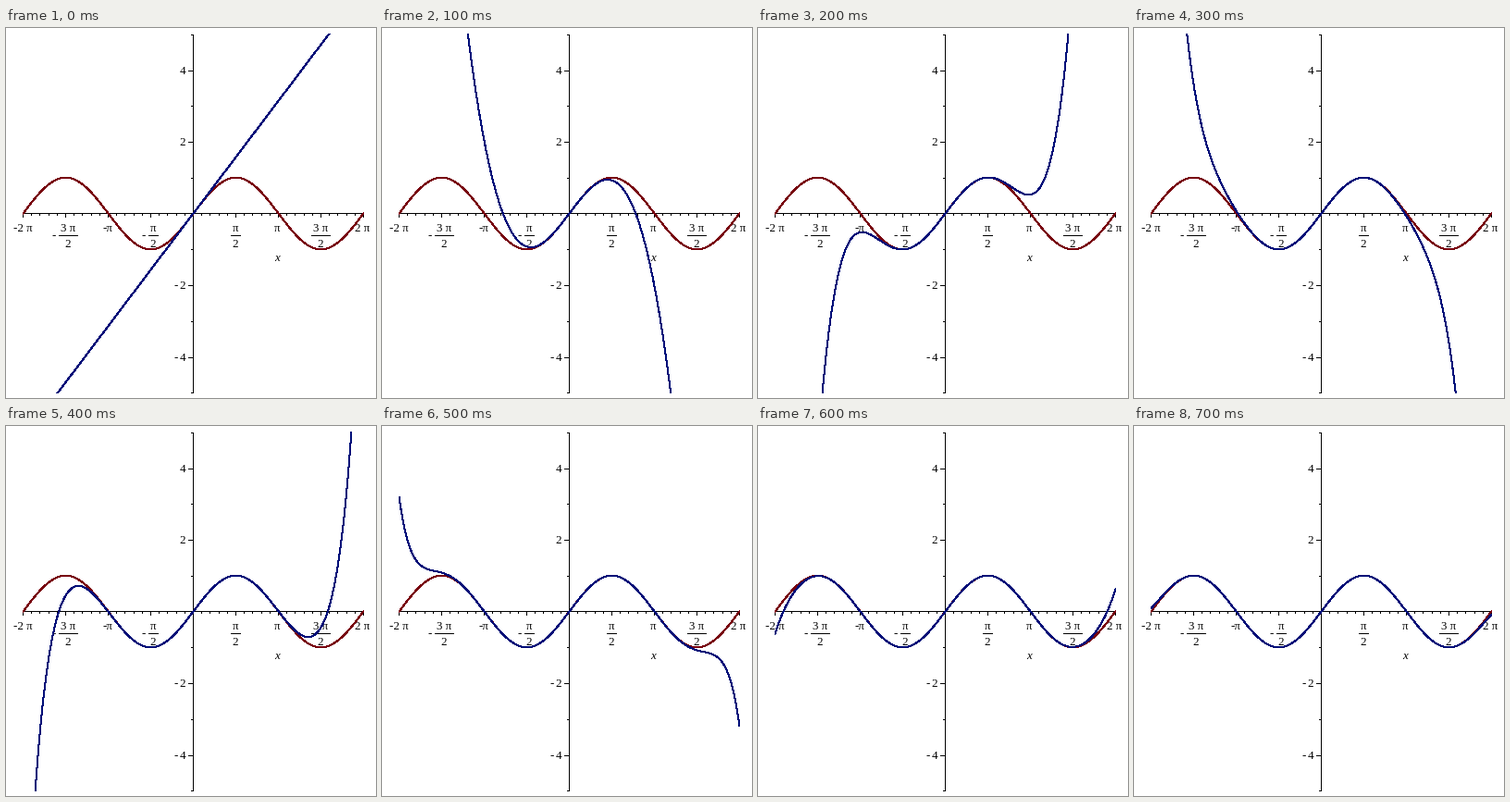
These frames come from a looping animation (400x400 px, 800 ms). A matplotlib script:

```python
import math

import matplotlib.pyplot as plt
import numpy as np
from matplotlib.animation import FuncAnimation
from matplotlib.patches import Rectangle

SIZE, DPI = 400, 100
PX = 72 / DPI
CX, CY = 202, 200  # pixel of the origin
SX, SY = 184 / (2 * math.pi), 38.75
RED, BLUE = "#78000e", "#000e78"
TERMS = 8

fig = plt.figure(figsize=(SIZE / DPI, SIZE / DPI), dpi=DPI, facecolor="white")
ax = fig.add_axes([0, 0, 1, 1])
ax.set(xlim=(0, SIZE), ylim=(SIZE, 0))
ax.axis("off")


def bar(x0, y0, x1, y1):
    """Fill the pixels from (x0, y0) to (x1, y1), both included."""
    ax.add_patch(Rectangle((x0, y0), x1 - x0 + 1, y1 - y0 + 1, color="black",
                           lw=0, antialiased=False, zorder=1))


def label(x, y, text, ha="center", style="normal"):
    ax.text(x, y, text, ha=ha, va="baseline", family="Liberation Serif",
            size=13 * PX, style=style, color="black", zorder=2)


def fraction(x, top, half, negative=False):
    label(x, 220, top)
    bar(x - half, 224, x + half, 224)
    label(x, 237, "2")
    if negative:
        label(x - half - 5, 228, "-")


def curve(color, zorder):
    line, = ax.plot([], [], color=color, lw=PX, antialiased=False,
                    solid_joinstyle="round", zorder=zorder)
    line.set_clip_path(Rectangle((18, 6), 369, 389, transform=ax.transData))
    return line


def plot(line, y):
    line.set_data(CX + 0.5 + SX * xs, CY + 0.5 - SY * y)


def taylor(x, terms):
    return sum((-1) ** k * x ** (2 * k + 1) / math.factorial(2 * k + 1)
               for k in range(terms))


# Axes and ticks
bar(18, CY, 386, CY)
bar(CX, 7, CX, 394)
for i in range(-20, 21):
    x = round(CX + i * 46 / 5)
    bar(x, CY, x, CY + (4 if i % 5 == 0 else 2))
for v in range(-5, 6):
    y = round(CY + 0.5 - v * SY)
    bar(CX - (5 if v % 2 == 0 else 2), y, CX, y)

# Labels
for v in (-4, -2, 2, 4):
    y = round(CY + 0.5 - v * SY) + 4
    label(194, y, str(abs(v)), ha="right")
    if v < 0:
        label(184, y, "-")
label(18.5, 220, "-2 π")
fraction(67, "3 π", 10, negative=True)
label(110, 220, "-π")
fraction(159, "π", 5, negative=True)
fraction(248, "π", 5)
label(293.5, 220, "π")
fraction(340, "3 π", 10)
label(385, 220, "2 π")
label(293.5, 252, "x", style="italic")

xs = np.linspace(-2 * math.pi, 2 * math.pi, 401)
sine = curve(RED, 3)
plot(sine, np.sin(xs))
approx = curve(BLUE, 4)


def update(frame):
    plot(approx, taylor(xs, frame + 1))
    return approx,


anim = FuncAnimation(fig, update, frames=TERMS, interval=100, repeat=True,
                     repeat_delay=0)
plt.show()
```
